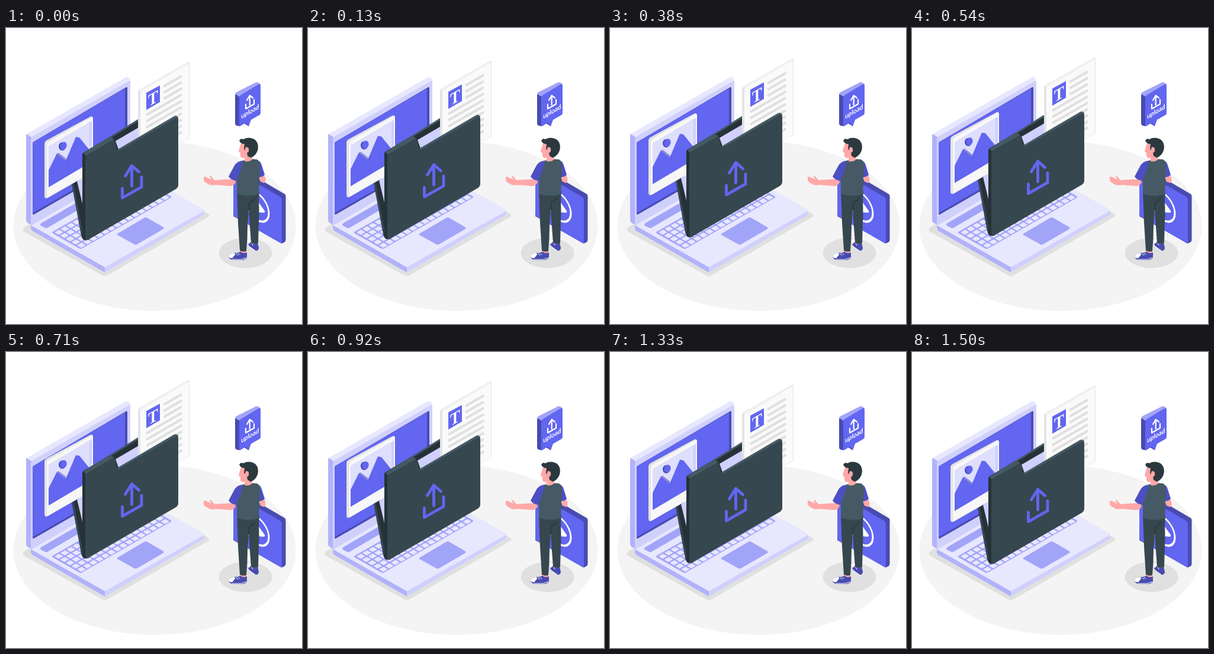
Write an HTML page that moves like this. It is 500 px wide and 500 px high and loops after 1540 ms.

```html
<!DOCTYPE html>
<html lang="en">
<head>
<meta charset="utf-8">
<title>Upload</title>
<style>
html, body { margin: 0; width: 100%; height: 100%; overflow: hidden; background: #fff }
svg { display: block; width: 100vw; height: 100vh }
.line { fill: none; stroke-linecap: round; stroke-linejoin: round }
.blue { fill: #6266f0 } .navy { fill: #484bb0 } .mid { fill: #a2a4f8 }
.lilac { fill: #d0d0fd } .pale { fill: #e7e7fe } .side { fill: #b1b2fa }
.dark { fill: #263238 } .slate { fill: #37474f } .steel { fill: #455a64 }
.skin { fill: #ffa8a7 } .white { fill: #fff } .gray { fill: #e0e0e0 }
.sleeve { fill: #4c4fc2 } .hair { fill: #2b393f }
</style>
</head>
<body>
<svg viewBox="0 0 500 500">
  <ellipse cx="251" cy="334.500" rx="238.500" ry="143.500" fill="#f4f4f4"/>

  <g id="laptop">
    <path class="gray" d="M30 337 42 330 210 240 342 314Q345 317 342 319L173 417Q167 421 161 417L30 344Q27 340 30 337Z"/>
    <path class="side" d="M42 333 167 404V413L45 343Q42 341 42 338Z"/>
    <path class="lilac" d="M167 404 335 308V313Q335 315 332 317L167 413Z"/>
    <path class="pale" d="M42 333 210 236 333 306Q336 308 333 310L167 404Z"/>
    <path class="side" d="M34 181Q34 179 37 179L44 184V333L38 330Q34 328 34 324Z"/>
    <path class="pale" d="M35 179 201 84Q204 82 207 84L210 87 44 185Z"/>
    <path class="lilac" d="M42 188Q42 185 45 183L206 90Q210 87 210 91V236L44 333Q42 333 42 330Z"/>
    <path class="navy" d="M45 195Q45 193 47 192L203 100Q205 99 205 102V224L47 315Q45 316 45 313Z"/>
    <path class="blue" d="M45 195Q45 193 47 192L201 102V223L45 312.500Z"/>
    <path class="mid" d="M59 330 150 277 162 284 71 337Q68 339 65 337L59 334Q57 332 59 330Z"/>
    <path class="mid" d="M79 344 231 257 278 284Q280 286 278 287L129 372Q126 374 123 372L79 347Q77 345 79 344Z"/>
    <g id="keys" class="pale" transform="matrix(10.1 -5.75 9.5 5.5 79.5 345.2)"/>
    <path class="mid" d="M189 347 233 321Q236 319 239 321L265 336Q268 338 265 340L222 365Q219 367 216 365L189 350Q186 349 189 347Z"/>
  </g>

  <g id="floating">
    <g id="spine">
      <path class="dark" d="M111 264 131 252 140 300V358L131 357Q128 355 127 350Z"/>
      <path class="steel" d="M111 264 114 262 131 352 128 351Z" opacity=".55"/>
      <path class="lilac" d="M120 259 131 250V305Z"/>
    </g>

    <g id="photo">
      <path fill="#e3e3e3" d="M65 195Q65 192 68 190L142 150Q145 148 147 151V240L72 286Q68 289 66 287Q65 286 65 283Z"/>
      <path fill="#f7f7f7" d="M69 197Q69 194 72 192L144 151Q147 150 147 153V243L72 286Q69 288 69 284Z"/>
      <path class="lilac" d="M72 200 145 157V226L72 269Z"/>
      <path fill="#dedefd" d="M72 200 141 160V228L72 269Z"/>
      <path class="blue" d="M72 240 86 212 101 224 118 184 124 185 141 206V228L72 269Z"/>
      <path class="navy" opacity=".55" d="M86 212 89 211 102 221 101 224ZM101 233 108 214 104 223Z"/>
      <ellipse class="navy" cx="95" cy="200" rx="6" ry="7"/>
      <ellipse class="blue" cx="97" cy="199" rx="5.500" ry="6.800" transform="rotate(20 97 199)"/>
    </g>

    <g id="back">
      <path class="dark" d="M130 211 180 181 224 153.500V170L183 193 134 217Z"/>
      <path class="steel" d="M130 211 180 181 224 153.500V157L178 185 135 212Z"/>
      <path class="lilac" d="M183 192 224 168 291 135V160L188 209Z"/>
    </g>

    <g id="document">
      <path fill="#e4e4e4" d="M223 107Q223 105 225 104L306 58Q310 56 310 60V186L223 236Z"/>
      <path fill="#fafafa" d="M227 109Q227 107 229 106L306 61Q309 59 309 62V186L227 234Z"/>
      <path fill="#f0f0f0" d="M223 105 306 58 309 60 227 108Z"/>
      <path class="blue" d="M237 109.500 260 97V125L237 138.500Z"/>
      <text class="white" transform="matrix(.866 -.5 0 1 248.5 128.5)" font-family="'Liberation Serif',serif" font-size="29" font-weight="bold" text-anchor="middle">T</text>
      <g id="rows" stroke="#e0e0e0" stroke-width="4.200"/>
    </g>

    <g id="front">
      <path class="dark" d="M129 214Q129 211 132 211L180 186 184 188 190 205 290 150V205L138 358Q131 360 129 355Z"/>
      <path class="steel" d="M131 212 178 185 183 188 135 216ZM187 206 284 149Q288 147 291 151L290 154 190 209Z"/>
      <path class="slate" d="M134 219Q134 216 137 214L179 190Q183 188 184 191L187 204Q188 209 193 206L287 152Q291 150 291 155V265Q291 269 287 272L140 357Q134 360 134 354Z"/>
      <path class="line" stroke="#6266f0" stroke-width="4.800" d="M212.500 235V267M201.500 250 212.500 232.500 224.500 243M196.500 271V287L229 268.500V252"/>
    </g>
  </g>

  <g id="bubble">
    <path class="navy" d="M387 112 395 113V166L390 165Q387 164 387 161Z"/>
    <path class="mid" d="M387 111Q388 109 390 108L422 92Q424 91 426 92L430 95 394 116Z"/>
    <path class="navy" d="M402 161 410 166 412 156Z"/>
    <path class="blue" d="M394 118Q394 115 397 113L427 95Q430 94 430 97V143Q430 146 428 147L414 155 410 166 405 160 397 165Q394 167 394 163Z"/>
    <path class="line" stroke="#fff" stroke-width="2.200" d="M411.700 115V130M407 122 411.700 114 417 118M405 129V136.500L419 128.500V121"/>
    <text class="white" transform="matrix(.866 -.5 0 1 397.2 153.6)" font-family="Lato,sans-serif" font-size="11.500" font-weight="700">upload</text>
  </g>

  <ellipse class="gray" cx="404.500" cy="380" rx="45" ry="25.500"/>
  <g id="video">
    <path class="navy" d="M389 236 395 236 470 280Q472.500 281 472.500 284V357Q472.500 361 470 362L466 364 384 318V238Z"/>
    <path class="blue" d="M384 242Q384 239 387 241L463 285Q466 287 466 290V361Q466 365 463 363L387 319Q384 317 384 314Z"/>
    <circle class="line" stroke="#fff" stroke-width="3.400" r="22.500" transform="matrix(.866 .5 0 1 424.5 302)"/>
    <path class="white" d="M423 291Q425 292 427 295L437 309Q438 312 435 312L423 311Z"/>
  </g>

  <g id="man">
    <path class="skin" d="M429 247 435 246 438 253Q440 259 436 262L429 259ZM395 372H406V383H395ZM416 360 426 358V369H417Z"/>
    <path class="navy" d="M408 360Q411 358 414 361L418 365 425 363 427 371Q427 377 421 376L413 370Q408 366 408 360Z"/>
    <path class="white" d="M408 362Q407 357 411 356L415 359 412 363 409 365Z"/>
    <path class="navy" d="M376 385Q381 379 390 380L396 378Q401 382 407 379V388Q405 391 398 392L384 392Q376 391 376 385Z"/>
    <path class="white" d="M376 385Q380 380 386 380L387 383 382 389 377 388Z"/>
    <path class="line" stroke="#fff" stroke-width="1" d="M388 381 392 384M392 380 395 383M414 362 417 367M382 391 397 391 406 388M412 370 421 376"/>
    <path class="slate" d="M390 276 428 276 427 292Q428 312 427 329L426 363Q420 366 414 363L411 322 410 306 408 333Q408 355 406 377Q400 379 395 376L392 329Z"/>
    <path class="line" stroke="#263238" stroke-width="1.200" d="M410 308 411 295Q418 292 420 287"/>
    <path class="skin" d="M386 255Q366 256 352 257L346 250Q345 249 344 251L347 256 336 251Q333 251 334 254 333 258 337 261L344 265Q350 266 355 265L379 267Q386 266 388 260Z"/>
    <path class="sleeve" d="M401 224Q390 224 385 234L376 251Q381 258 390 258L402 241ZM424 224Q430 223 433 235L437 248Q433 252 427 252Z"/>
    <path class="steel" d="M400 224 411 221 424 222Q429 225 429 233L427 280Q412 287 390 280V255Q397 243 400 224Z"/>
    <path class="skin" d="M397 195Q394 203 393 209L396 211 396 217Q398 221 403 219L403 225Q410 227 416 222L414 205 409 194Z"/>
    <path class="hair" d="M394 190 397 187Q402 189 405 186 414 184 421 189 428 196 425 207 421 217 413 219L408 216 407 210Q411 206 409 202L405 201 404 207 402 204 403 196Q396 196 394 190Z"/>
    <ellipse class="skin" cx="407" cy="206" rx="3.200" ry="4.500"/>
  </g>
</svg>
<script>
const LOOP = 1540, PEAK = 735, RISE = 10;
const byId = id => document.getElementById(id);

let keys = '';
for (let row = 0; row < 5; row++)
  for (let col = 0; col < 15; col++)
    keys += `<rect x="${col + .13}" y="${row + .13}" width=".76" height=".74" rx=".1"/>`;
byId('keys').innerHTML = keys;

let rows = '';
for (let i = 0; i < 10; i++) {
  const x = i < 3 ? 266 : 237, y = 81 + i * 10.5;
  rows += `<path d="M${x} ${y + (297 - x) * .577}L297 ${y}"/>`;
}
byId('rows').innerHTML = rows;

const floating = byId('floating');
function draw(now) {
  const t = now % LOOP;
  const lift = RISE * Math.abs(1 - Math.abs(1 - t / PEAK));
  floating.setAttribute('transform', `translate(0 ${-lift})`);
  requestAnimationFrame(draw);
}
draw(performance.now());
</script>
</body>
</html>
```
